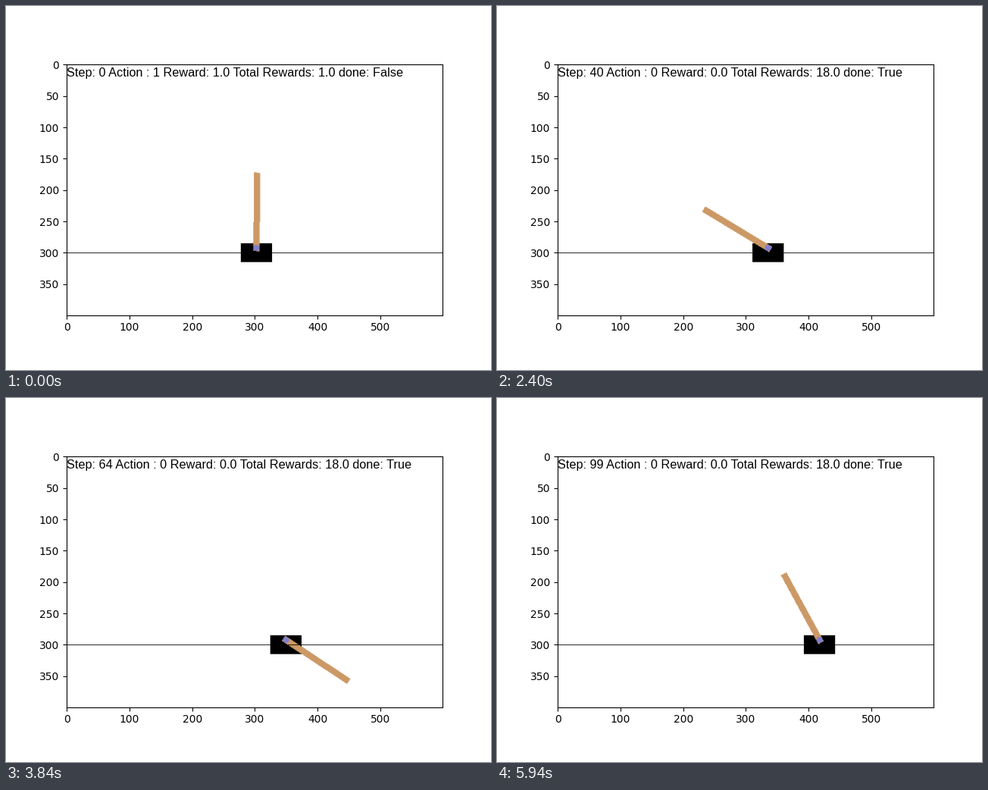
A matplotlib script that plays this animation: 640x480 px, repeating every 6000 ms.

```python
import matplotlib.pyplot as plt
import numpy as np
from matplotlib.animation import FuncAnimation

STEPS, INTERVAL = 100, 60
WIDTH, HEIGHT = 600, 400
TRACK_Y, AXLE_Y = 300, 292.5
FAIL_STEP = 17

WHITE, BLACK = (255, 255, 255), (0, 0, 0)
POLE, AXLE = (204, 153, 102), (127, 127, 204)

# Key poses: step, cart centre, pole angle from upright
key_steps, key_carts, key_angles = np.transpose([
    (0, 303.0, 0.012),
    (19, 323.0, -0.245),
    (40, 336.0, -1.029),
    (56, 347.2, -2.826),
    (64, 350.2, -4.130),
    (77, 374.4, -5.601),
    (99, 418.2, -6.782),
])


def glide(values, step):
    """Cubic path through the key values, with slopes taken from neighbours."""
    slopes = np.gradient(values, key_steps)
    i = min(np.searchsorted(key_steps, step, side="right"), len(values) - 1) - 1
    span = key_steps[i + 1] - key_steps[i]
    u = (step - key_steps[i]) / span
    ease = u * u * (3 - 2 * u)
    bend = u * (1 - u) * ((1 - u) * slopes[i] - u * slopes[i + 1])
    return values[i] + ease * (values[i + 1] - values[i]) + span * bend


rows, cols = np.mgrid[0:HEIGHT, 0:WIDTH] + 0.5


def render(step):
    """Rasterise the cart, pole, axle and track."""
    angle = glide(key_angles, step)
    dx, dy = cols - glide(key_carts, step), rows - AXLE_Y
    sin, cos = np.sin(angle), np.cos(angle)
    along, across = dx * sin - dy * cos, dx * cos + dy * sin

    img = np.full((HEIGHT, WIDTH, 3), WHITE, dtype=np.uint8)
    img[(abs(dx) <= 25) & (abs(rows - TRACK_Y) <= 15)] = BLACK
    img[(along >= -5) & (along <= 120) & (abs(across) <= 5)] = POLE
    img[dx**2 + dy**2 <= 25] = AXLE
    img[TRACK_Y] = BLACK
    return img


def caption(step):
    action = int(step * 7 % 19 < 7)
    reward = 1.0 if step <= FAIL_STEP else 0.0
    total = float(min(step, FAIL_STEP) + 1)
    return (f"Step: {step} Action : {action} Reward: {reward} "
            f"Total Rewards: {total} done: {step >= FAIL_STEP}")


fig, ax = plt.subplots(figsize=(6.4, 4.8), dpi=100)
view = ax.imshow(render(0))
label = ax.text(80, 387, caption(0), transform=None, family="Liberation Sans",
                fontsize=11.7, color="black", va="baseline")


def update(step):
    view.set_data(render(step))
    label.set_text(caption(step))
    return view, label


anim = FuncAnimation(fig, update, frames=STEPS, interval=INTERVAL, repeat=True)
plt.show()
```
